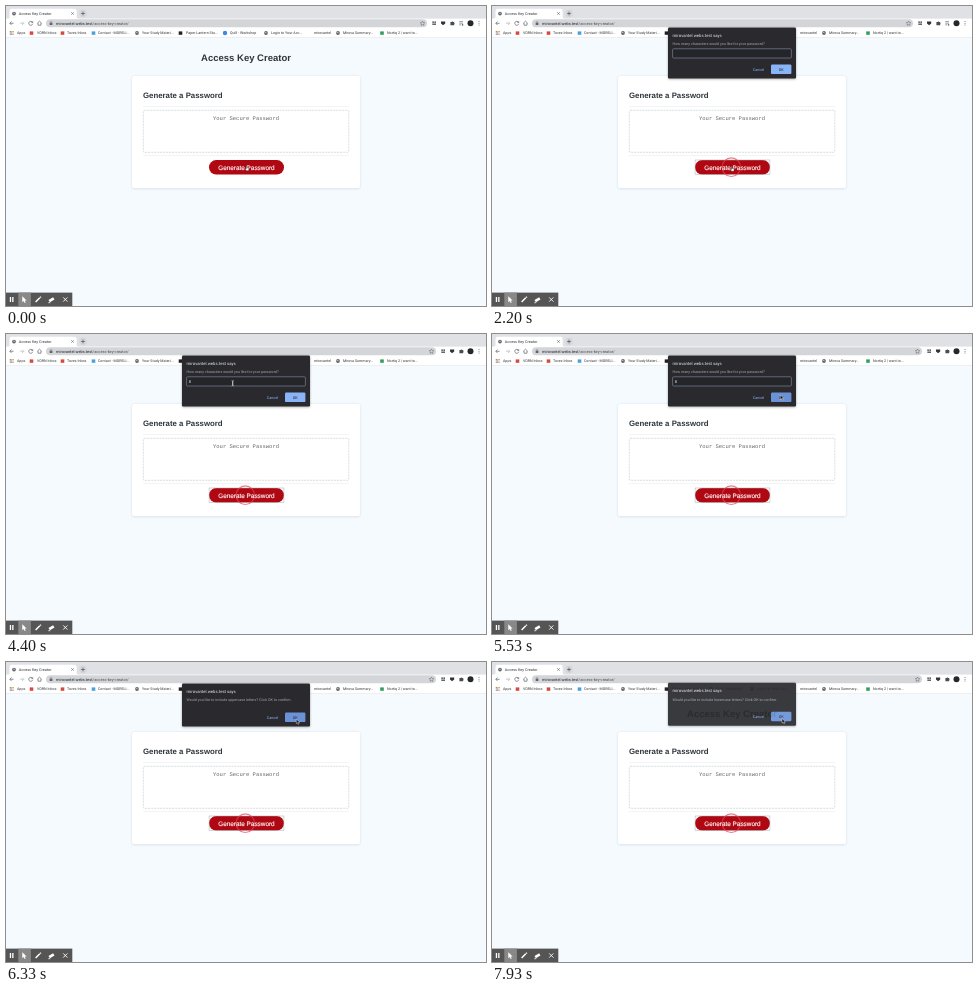
Recreate the animation shown at these times as an HTML page. Size 480 px wide and 300 px high, loop 8000 ms.

```html
<!DOCTYPE html>
<html lang="en">
<head>
<meta charset="utf-8">
<title>Access Key Creator</title>
<style>
  html, body { margin: 0; width: 100%; height: 100%; overflow: hidden; background: #f5fafe; }
  svg { display: block; width: 100vw; height: 100vh; }
  text { font-family: Roboto, Inter, sans-serif; text-rendering: geometricPrecision; white-space: pre; }
  .page { font-family: "Liberation Sans", Arial, sans-serif; }
  .mono { font-family: "Liberation Mono", monospace; }
  .bold { font-weight: 700; }
  .mid { text-anchor: middle; }
  .label { stroke: #fff; stroke-width: .14px; }
</style>
</head>
<body>
<svg id="stage" viewBox="0 0 480 300" preserveAspectRatio="none"></svg>
<script>
const LOOP = 8000, TICK = 1000 / 15;
const HOST = 'mirovantel.webs.test', TITLE = 'Access Key Creator';

const text = (x, y, size, str, fill, cls = '') =>
  `<text x="${x}" y="${y}" font-size="${size}" fill="${fill}" class="${cls}">${str}</text>`;
const rect = (x, y, w, h, fill, more = '') =>
  `<rect x="${x}" y="${y}" width="${w}" height="${h}" fill="${fill}" ${more}/>`;
const dot = (x, y, r, fill, more = '') =>
  `<circle cx="${x}" cy="${y}" r="${r}" fill="${fill}" ${more}/>`;
const line = (d, stroke, width = 0.7, more = '') =>
  `<path d="${d}" fill="none" stroke="${stroke}" stroke-width="${width}" ${more}/>`;

const globe = (x, y) => dot(x, y, 1.9, '#5f6368') +
  line(`M${x - 1.2} ${y - .5}h1.4l.8 1`, '#fff', 0.5);

function appsIcon(x, y) {
  const tints = ['#d95040', '#e3b33c', '#4d9b5c', '#4a7fd6'];
  let out = '';
  for (let i = 0; i < 9; i++)
    out += rect(x + (i % 3) * 1.4, y + Math.floor(i / 3) * 1.4, 1, 1, tints[i % 4]);
  return out;
}

// icon x, kind or colour, label x, label
const BOOKMARKS = [
  [25.5, '#d8493d', 31, 'VORN Inbox'],
  [56.5, '#d8493d', 61, 'Tovex Inbox'],
  [87.5, '#45a3d9', 92, 'Contact - MORELI...'],
  [131, 'globe', 136, 'Your Study Materi...'],
  [174.5, '#222', 180, 'Paper Lantern Stu...'],
  [219, 'round', 224, 'Quill - Workshop'],
  [260, 'globe', 265, 'Login to Your Acc...'],
  [303.5, '', 308, 'mirovantel'],
  [332, 'globe', 337, 'Mirova Summary...'],
  [376, '#2ea15a', 381, 'Nortiq 2 | want to...']
];

function bookmark([ix, kind, tx, label]) {
  const icon = kind === 'globe' ? globe(ix, 27)
    : kind === 'round' ? dot(ix, 27, 2.2, '#3f86ee')
    : kind ? rect(ix - 1.8, 25.4, 3.6, 3.4, kind) : '';
  return icon + text(tx, 28.3, 3.65, label, '#303336');
}

const browser =
  rect(0, 0, 480, 13, '#dfe1e5') +
  '<path d="M1.5 13Q3.5 13 3.5 11V5Q3.5 2.8 5.7 2.8H68.5Q70.7 2.8 70.7 5V11Q70.7 13 72.7 13Z" fill="#fff"/>' +
  globe(8, 7.6) + text(12.7, 8.9, 3.8, TITLE, '#303336') +
  line('M65.2 6.2l2.6 2.6m0-2.6l-2.6 2.6', '#5f6368', 0.6) +
  dot(77, 7.5, 3.7, '#d2d5da') + line('M75.2 7.5h3.6M77 5.7v3.6', '#4c5055', 0.7) +
  rect(0, 12.6, 480, 19.2, '#fff') +
  line('M7.6 17.3H4M5.6 15.5L3.8 17.3l1.8 1.8', '#5f6368') +
  line('M14 17.3h3.6M16 15.5l1.8 1.8-1.8 1.8', '#b9bcc0') +
  line('M26.5 16.3A2 2 0 1 0 26.7 17.8M26.7 15.2v1.4h-1.4', '#5f6368') +
  line('M31.3 17.2l2.2-2 2.2 2M32 17v2.2h3V17', '#5f6368') +
  rect(40, 13.3, 381, 8, '#d3d5d8', 'id="pill" rx="4"') +
  rect(43.7, 16.8, 2.7, 2.2, '#5f6368') + line('M44.2 16.8v-.8q.8-1.4 1.7 0v.8', '#5f6368', 0.5) +
  text(50, 18.7, 3.95, HOST + '<tspan fill="#4a4d51">/access-key-creator/</tspan>', '#202124') +
  '<g id="tools">' +
  '<path d="M416.5 15l.7 1.5 1.6.2-1.2 1.1.3 1.6-1.4-.8-1.4.8.3-1.6-1.2-1.1 1.6-.2z" fill="none" stroke="#5f6368" stroke-width=".5"/>' +
  rect(426.3, 15.4, 1.6, 1.5, '#555') + rect(428.4, 15.4, 1.6, 1.5, '#555') +
  rect(426.3, 17.5, 3.7, 1.4, '#555') +
  '<path d="M435 15.4h4.2v2.2l-2.1 1.7-2.1-1.7z" fill="#333"/>' +
  '<path d="M444.4 16h1.3q.6-1.5 1.2 0h1.3v1.2q1.3.5 0 1.1v1h-3.8z" fill="#4a4d51"/></g>' +
  '<g id="media">' + line('M453.2 15.6h3.8M453.2 17.2h3.8M453.2 18.8h2', '#5f6368', 0.6) +
  dot(456.6, 18.9, 0.8, '#5f6368') + '</g>' +
  dot(464.5, 17.2, 3, '#25282b') +
  dot(473, 15.4, 0.5, '#5f6368') + dot(473, 17.2, 0.5, '#5f6368') + dot(473, 19, 0.5, '#5f6368') +
  appsIcon(3.8, 25) + text(11, 28.3, 3.65, 'Apps', '#303336') +
  BOOKMARKS.map(bookmark).join('') +
  rect(0, 31.4, 480, 0.5, '#dcdfe3');

const page =
  text(240, 55.4, 9.5, TITLE, '#2e353b', 'page bold mid') +
  rect(126, 70, 228, 112, '#fff', 'rx="2.5" filter="url(#soft)"') +
  text(137, 92.2, 7.83, 'Generate a Password', '#2e353b', 'page bold') +
  rect(137, 100.2, 206, 0.5, '#e6e9ec') +
  rect(137.3, 104.3, 205.5, 42, '#fff', 'rx="1" stroke="#cbced1" stroke-width=".7" stroke-dasharray="2 1"') +
  text(240, 114, 5.5, 'Your Secure Password', '#686868', 'mono mid') +
  rect(137, 149.2, 206, 0.5, '#e6e9ec') +
  rect(203, 154.1, 75, 14.4, '#b00812', 'rx="7.2"') +
  '<g id="focus">' +
  rect(203.1, 154, 74.8, 14.6, 'none', 'stroke="#a3a9af" stroke-width=".5"') + '</g>' +
  dot(239.3, 161.2, 9.3, 'none', 'id="ring" stroke="#e2475a" stroke-width="1.2" opacity=".7"') +
  text(240.4, 163.5, 6.4, 'Generate Password', '#fff', 'page mid label');

function dialog(id, h, message, hasInput) {
  const by = 21.5 + h - 14;
  return `<g id="${id}">` +
    rect(176, 21.5, 128, h, '#292a2d', 'rx="1.3" filter="url(#drop)"') +
    text(180.6, 31, 4.25, HOST + ' says', '#e8eaed') +
    text(180.6, 39.3, 3.7, message, '#a4a8ad') +
    (hasInput
      ? rect(180.6, 42.8, 118.8, 9.2, '#242529', 'rx="1" stroke="#76829a" stroke-width=".7"') +
        '<g id="digit">' + text(182.8, 49, 4, '8', '#e8eaed') + '</g>' +
        rect(182.8, 45, 0.5, 5, '#e8eaed', 'id="caret"')
      : '') +
    text(266.5, by + 6.2, 3.75, 'Cancel', '#8ab4f8', 'mid') +
    rect(279, by, 20.4, 9.6, '#8ab4f8', `rx="1.2" id="${id}ok"`) +
    text(289.2, by + 6.2, 3.75, 'OK', '#202124', 'mid') + '</g>';
}

const ask = kind => `Would you like to include ${kind} letters? Click OK to confirm.`;

const recorder =
  rect(0, 286.6, 66.3, 13.4, '#555') + rect(12.3, 286.6, 12.6, 13.4, '#888') +
  rect(3.8, 291, 1.3, 5, '#fff') + rect(6.2, 291, 1.3, 5, '#fff') +
  '<path d="M16.3 290.2v6l1.4-1.3 1 2 1-.5-1-1.9h1.9z" fill="#fff"/>' +
  line('M29.6 296l4.2-4.2', '#fff', 1.5) + line('M34.2 291.4l.7-.7', '#fff', 1.5) +
  line('M43.2 295.2l4.6-2.8', '#fff', 2.6) + line('M42.3 296.7h2', '#fff', 0.8) +
  line('M57.2 291.4l4.2 4.2m0-4.2l-4.2 4.2', '#fff', 0.9);

const cursors =
  '<g id="hand"><path d="M-.4 0q.4-.6.8 0v1.7l1.6.4q.5.2.4.8l-.4 1.8h-2.2l-1.4-1.8q0-.6.6-.4l.6.4z" fill="#fff" stroke="#222" stroke-width=".45"/></g>' +
  '<g id="arrow"><path d="M0 0v4.6l1.1-1 .8 1.8.8-.4-.8-1.7h1.5z" fill="#111" stroke="#fff" stroke-width=".4"/></g>' +
  '<g id="beam">' + line('M-1 -2.6q1 0 1 .7v3.8q0 .7-1 .7M1 -2.6q-1 0-1 .7v3.8q0 .7 1 .7', '#e4e4e4', 0.6) + '</g>';

document.getElementById('stage').innerHTML =
  '<defs><filter id="soft" x="-10%" y="-10%" width="120%" height="125%"><feDropShadow dx="0" dy=".5" stdDeviation="1.1" flood-color="#28405a" flood-opacity=".16"/></filter>' +
  '<filter id="drop" x="-10%" y="-20%" width="120%" height="150%"><feDropShadow dx="0" dy=".6" stdDeviation="1" flood-color="#000" flood-opacity=".35"/></filter></defs>' +
  rect(0, 0, 480, 300, '#f5fafe') + page + browser +
  dialog('count', 51, 'How many characters would you like for your password?', true) +
  dialog('upper', 43, ask('uppercase'), false) +
  dialog('lower', 43, ask('lowercase'), false) +
  recorder + cursors;

const el = id => document.getElementById(id);
const show = (id, on) => { el(id).style.display = on ? '' : 'none'; };

// time, x, y of the pointer tip
const PATH = [
  [0, 240.6, 160], [533, 240.6, 160], [867, 239.8, 160.6], [2667, 239.8, 160.6],
  [2867, 249, 135], [3067, 247, 88], [3200, 236, 60], [3333, 227, 49.6],
  [3467, 226.7, 49.2], [4600, 226.7, 49.2], [4800, 243, 51.5], [4867, 268, 57],
  [4933, 288.3, 61], [6133, 288.3, 61], [6333, 290.3, 57], [6667, 290.3, 57],
  [6733, 290, 56.5], [8000, 290, 56.5]
];
// time, opacity, vertical offset
const FADES = {
  count: [[1732, 0, 0], [1733, 1, 0], [5567, 1, 0], [5667, 0, -1]],
  upper: [[5733, 0, -2], [5867, .82, -.7], [5933, 1, 0], [7533, 1, 0], [7667, 0, -1]],
  lower: [[7733, 0, -2.5], [7933, .92, -.8], [8000, 1, 0]]
};
const CARET_ON = [[1733, 2200], [2733, 3200], [3667, 4330], [4800, 5333]];

function at(keys, t) {
  if (t <= keys[0][0]) return keys[0].slice(1);
  const i = keys.findIndex(k => k[0] >= t);
  if (i < 0) return keys[keys.length - 1].slice(1);
  const a = keys[i - 1], b = keys[i], p = (t - a[0]) / (b[0] - a[0]);
  return a.slice(1).map((v, n) => v + (b[n + 1] - v) * p);
}

function draw(t) {
  const [x, y] = at(PATH, t);
  const shape = y > 154 && y < 169 ? 'hand'
    : t > 3200 && y > 42 && y < 52.5 && x < 285 && t < 4870 ? 'beam' : 'arrow';
  for (const id of ['hand', 'arrow', 'beam']) show(id, id === shape);
  el(shape).setAttribute('transform', `translate(${x} ${y})`);

  for (const id in FADES) {
    const [alpha, dy] = at(FADES[id], t);
    show(id, alpha > 0);
    el(id).setAttribute('opacity', alpha);
    el(id).setAttribute('transform', `translate(0 ${dy})`);
    const top = id === 'count' ? 58.5 : 50.5;
    const hover = x > 279 && x < 299.4 && y > top && y < top + 9.6;
    el(id + 'ok').setAttribute('fill', hover ? '#6b92d6' : '#8ab4f8');
  }

  const clicked = t >= 1398;
  show('focus', clicked);
  show('ring', clicked);
  el('ring').setAttribute('r', at([[1398, 5], [1600, 9.3]], t)[0]);

  const typed = t >= 3998;
  show('digit', typed);
  show('caret', CARET_ON.some(([a, b]) => t >= a - 2 && t < b - 2));
  el('caret').setAttribute('x', typed ? 185.6 : 182.8);

  // the address bar widens once the media button is gone
  const gain = t >= 2398 ? 9 : 0;
  show('media', !gain);
  el('pill').setAttribute('width', 381 + gain);
  el('tools').setAttribute('transform', `translate(${gain} 0)`);
}

const start = performance.now();
function tick(now) {
  const t = Math.max(0, now - start) % LOOP;
  draw(Math.floor((t + 4) / TICK) * TICK);
  requestAnimationFrame(tick);
}
draw(0);
requestAnimationFrame(tick);
</script>
</body>
</html>
```
